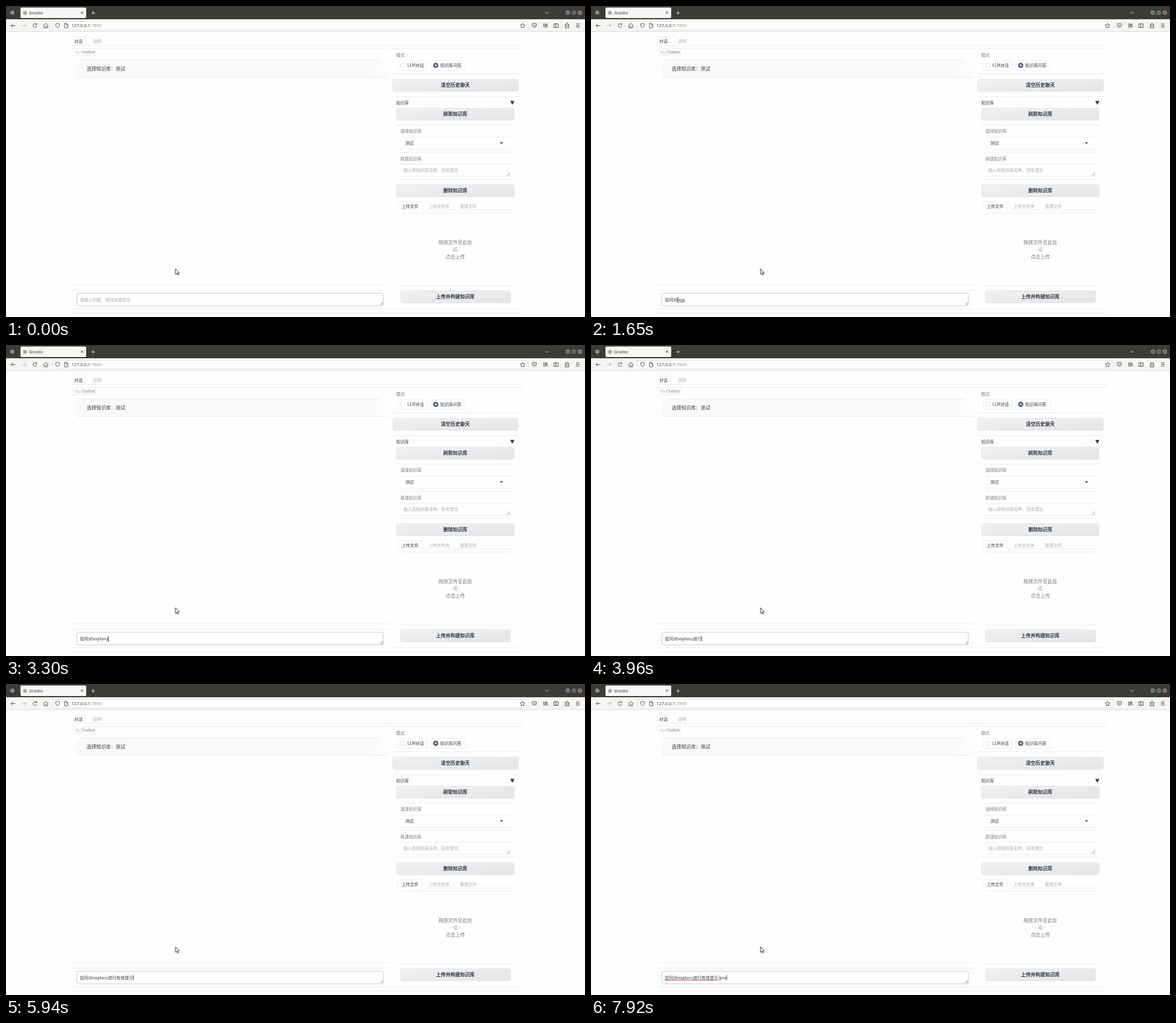
These frames come from a looping animation (960 px wide and 516 px high, 8000 ms). An HTML page:

```html
<!DOCTYPE html>
<html lang="zh-CN">
<head>
<meta charset="utf-8">
<title>Gradio</title>
<style>
html, body { margin: 0; width: 100%; height: 100%; overflow: hidden; background: #fefefe; }
svg { display: block; width: 960px; height: 516px; }
text { font: 7px "Noto Sans CJK SC", "Noto Sans CJK", sans-serif; fill: #34383e; white-space: pre; }
.ui { font: 7.4px "Noto Sans", sans-serif; fill: #3d3d3d; }
.mid { font-size: 8px; text-anchor: middle; fill: #747a84; }
.btn { font-weight: bold; fill: #30353e; }
.label { fill: #737982; }
.pale { fill: #a6abb2; }
.line { fill: none; stroke: #ededed; }
.icon { fill: none; stroke: #55554f; stroke-width: 1; }
</style>
</head>
<body>
<svg viewBox="0 0 960 516">
  <defs>
    <linearGradient id="grey" x2="1" y2="1">
      <stop stop-color="#f0f1f2"/><stop offset="1" stop-color="#e3e5e7"/>
    </linearGradient>
    <linearGradient id="fade">
      <stop stop-color="#f8f9f9"/><stop offset=".93" stop-color="#f8f9f9"/><stop offset="1" stop-color="#fdfdfd"/>
    </linearGradient>
  </defs>

  <!-- browser window -->
  <path fill="#3c3b36" d="M0 0h960v22H0z"/>
  <circle cx="10.5" cy="11" r="3.6" fill="#8d8b87"/>
  <rect x="24" y="2.5" width="109" height="17.5" rx="2" fill="#f6f6f4"/>
  <circle cx="31.5" cy="11.5" r="3.2" fill="#a5a5a3"/>
  <text class="ui" x="38" y="14.4">Gradio</text>
  <path class="icon" d="M124.2 9.2l3.6 3.6m0-3.6l-3.6 3.6"/>
  <path class="icon" style="stroke:#d0cfca" d="M141.5 11.5h6m-3-3v6M894 9.8l2.7 2.7 2.7-2.7"/>
  <circle cx="931.5" cy="11" r="3.8" fill="#777b84"/>
  <circle cx="941.5" cy="11" r="3.8" fill="#74777c"/>
  <circle cx="951.5" cy="11" r="3.8" fill="#8b7d7a"/>
  <path class="icon" style="stroke:#45443f;stroke-width:.9" d="M929.8 11.5h3.4M940 9.6h3v2.8h-3zM950.1 9.6l2.8 2.8m0-2.8l-2.8 2.8"/>

  <path fill="#f5f5f3" d="M0 22h960v20H0z"/>
  <path stroke="#dededc" d="M0 42.5h960"/>
  <rect x="77.5" y="25.5" width="788" height="14" rx="2" fill="#fefefe" stroke="#e3e3e1"/>
  <path class="icon" d="M15.5 32.5h-7m3-3l-3 3 3 3"/>
  <path class="icon" style="stroke:#b9b9b6" d="M26.5 32.5h7m-3-3l3 3-3 3"/>
  <path class="icon" d="M50.6 30.4a3.2 3.2 0 1 0 .5 3M51 28.5v2.4h-2.6M62 32.4l4-3.6 4 3.6M63 32v4h6v-4M66 36v-2.5"/>
  <path class="icon" d="M85.5 28.6l3 1v2.6q0 2.6-3 4.2-3-1.6-3-4.2v-2.6zM97 28.8h3.3l2.2 2.2v5.2H97zM100 29v2.3h2.3"/>
  <text class="ui" x="108.5" y="35.3">127.0.0.1<tspan fill="#999">:7860</tspan></text>
  <path class="icon" d="M856.5 28.5l1.2 2.5 2.8.4-2 2 .5 2.8-2.5-1.3-2.5 1.3.5-2.8-2-2 2.8-.4z"/>
  <path class="icon" d="M872.6 29.2h6.8v2.6a3.4 3.4 0 0 1-6.8 0zM874.4 31.5l1.6 1.6 1.6-1.6M891.5 29v6.8m2-6.8v6.8m2-6.8v6.8m.8-6.6l1.8 6.4M908.5 29.5h7v6h-7zM911.5 29.5v6M927.2 30.5h2q-.6-2 1-2t1 2h2v2q-2-.6-2 .8t2 1v2h-6v-2.2q2 .4 2-1.1t-2-.8zM945 29.7h6m-6 2.6h6m-6 2.6h6"/>

  <!-- chat column -->
  <path class="line" d="M110 65.5h747M113 51.5h19v14M110 70.5h525M641 70.5h214M110 70v7M110 462.5h525M110 471.5h525M110 502.5h525M110 509.5h745"/>
  <text x="113" y="61.2">对话</text>
  <text class="pale" x="144" y="61.2">说明</text>
  <path class="line" d="M110 82.5h38.5v-12"/>
  <path class="icon" style="stroke:#b5b8bc;stroke-width:.7" d="M115.5 75h3.6v3h-3.6zM119.8 76h2v3h-3"/>
  <text x="124.7" y="79.2" style="font-size:6px" class="label">Chatbot</text>
  <path fill="url(#fade)" d="M126 89.5h496q10 0 16 10v19H117V96q3-6.500 9-6.500z"/>
  <path stroke="#e9ebeb" d="M117 118.500h516M124 89.500h494"/>
  <text x="133.800" y="106.700" style="font-size:8px">选择知识库：测试</text>

  <!-- settings column -->
  <path class="line" d="M641 112.500h210M641 150.500h209M647 197.500h196M654 217.500h183M654 237.500h183M647 242.500h196M654 262.500h183M654 282.500h183M647 287.500h196M647 338.500h3v-14h40v14h153M654 343.500h183M654 464.500h183M641 502.500h209"/>
  <text class="label" x="647" y="83.700">模式</text>
  <rect class="line" x="650.500" y="90.500" width="47" height="16" rx="2"/>
  <rect class="line" x="704.500" y="90.500" width="57" height="16" rx="2"/>
  <circle cx="658" cy="98.500" r="3.800" fill="#fefefe" stroke="#e2e4e6"/>
  <circle cx="712.500" cy="98.500" r="3" fill="#fff" stroke="#47566b" stroke-width="2.500"/>
  <text x="665.600" y="101.200">LLM对话</text>
  <text x="720" y="101.200">知识库问答</text>
  <text x="647" y="162.700">知识库</text>
  <path fill="#33363b" d="M836 157.500h7l-3.500 6.500z"/>
  <text class="label" x="654" y="210.400">选择知识库</text>
  <text x="662" y="229.900">测试</text>
  <path fill="#444" d="M819 226h5l-2.500 3z"/>
  <text class="label" x="654" y="255.700">新建知识库</text>
  <text class="pale" x="659" y="274.700">输入新知识库名称，回车提交</text>
  <path class="icon" style="stroke:#888" d="M830.500 281.500l5-5m-2 5l2-2"/>
  <text x="656" y="334.700">上传文件</text>
  <text class="pale" x="700.500" y="334.700">上传文件夹</text>
  <text class="pale" x="752.500" y="334.700">管理文件</text>
  <text class="mid" x="745" y="395">拖放文件至此处</text>
  <text class="mid" x="745" y="407" style="fill:#a6abb2">- 或 -</text>
  <text class="mid" x="745" y="419">点击上传</text>
  <g id="buttons"></g>

  <!-- question box -->
  <rect x="117.500" y="476.500" width="508" height="21" rx="2.500" fill="#fefefe" stroke="#bfd0de"/>
  <path class="icon" style="stroke:#888" d="M620.500 496l4.500-4.500m-2 4.500l2-2"/>
  <text id="hint" class="pale" x="122.500" y="489.700">请输入问题，按回车键提交</text>
  <text id="done" x="122.500" y="489.700"></text>
  <text id="draft" y="489.700"></text>
  <path id="rule" stroke="#444" stroke-width=".7"/>
  <path id="spell" stroke="#b53a3a" stroke-dasharray="1.500 .5"/>
  <path id="caret" stroke="#222" stroke-width=".8"/>
  <path d="M281 436v9.200l2.100-1.900 1.400 3.100 1.500-.7-1.400-3h2.800z" fill="#fff" stroke="#222" stroke-width=".9"/>
</svg>
<script>
const $ = id => document.getElementById(id);

$('buttons').innerHTML = [
  [641, 121, 209, '清空历史聊天'],
  [647, 169, 196, '刷新知识库'],
  [647, 296, 196, '删除知识库'],
  [654, 472, 183, '上传并构建知识库']
].map(([x, y, w, label]) =>
  `<rect x="${x + .5}" y="${y + .5}" width="${w - 1}" height="20" rx="3" fill="url(#grey)" stroke="#e4e6e8"/>
   <text class="mid btn" x="745" y="${y + 13.2}">${label}</text>`).join('');

const ask = '如何对', topic = ask + 'voptaru', act = topic + '进行', good = act + '有效', full = good + '提示';

// start time, committed text, text still being composed, caret shown
const steps = [
  [0, '', '', 0],
  [330, '', 'ru', 1],
  [660, '', 'ruhedu', 1],
  [990, ask, '', 1],
  [1320, ask, 'v', 1],
  [1650, ask, 'vop', 1],
  [2310, ask, 'vopt', 1],
  [2640, ask, 'voptar', 0],
  [2970, topic, '', 1],
  [3300, topic, 'j', 1],
  [3630, topic, 'jinx', 1],
  [3960, act, '', 1],
  [4290, act, 'y', 1],
  [4620, act, 'youx', 1],
  [5280, good, 'ti', 1],
  [5610, good, 'tish', 1],
  [5940, full, '', 1],
  [6270, full, '', 0],
  [6600, full + '(', '', 1],
  [6930, full + '(', '', 0],
  [7260, full + '(', '', 1],
  [7590, full + '(p', '', 1],
  [7920, full + '(pro', '', 1]
];

const width = el => el.textContent ? el.getComputedTextLength() : 0;
const left = 122.5;

function draw(now) {
  const time = now % 8000;
  const [, done, draft, caret] = steps.findLast(s => s[0] <= time);
  $('done').textContent = done;
  $('draft').textContent = draft;
  $('hint').style.display = done || draft ? 'none' : '';
  const x = left + width($('done'));
  $('draft').setAttribute('x', x);
  $('rule').setAttribute('d', draft ? `M${x} 491.2h${width($('draft'))}` : '');
  $('caret').setAttribute('d', caret ? `M${x + .4} 483v8.500` : '');
  $('spell').setAttribute('d', done.length > full.length
    ? `M${left} 491.500h${$('done').getSubStringLength(0, full.length)}` : '');
  requestAnimationFrame(draw);
}
requestAnimationFrame(draw);
</script>
</body>
</html>
```
